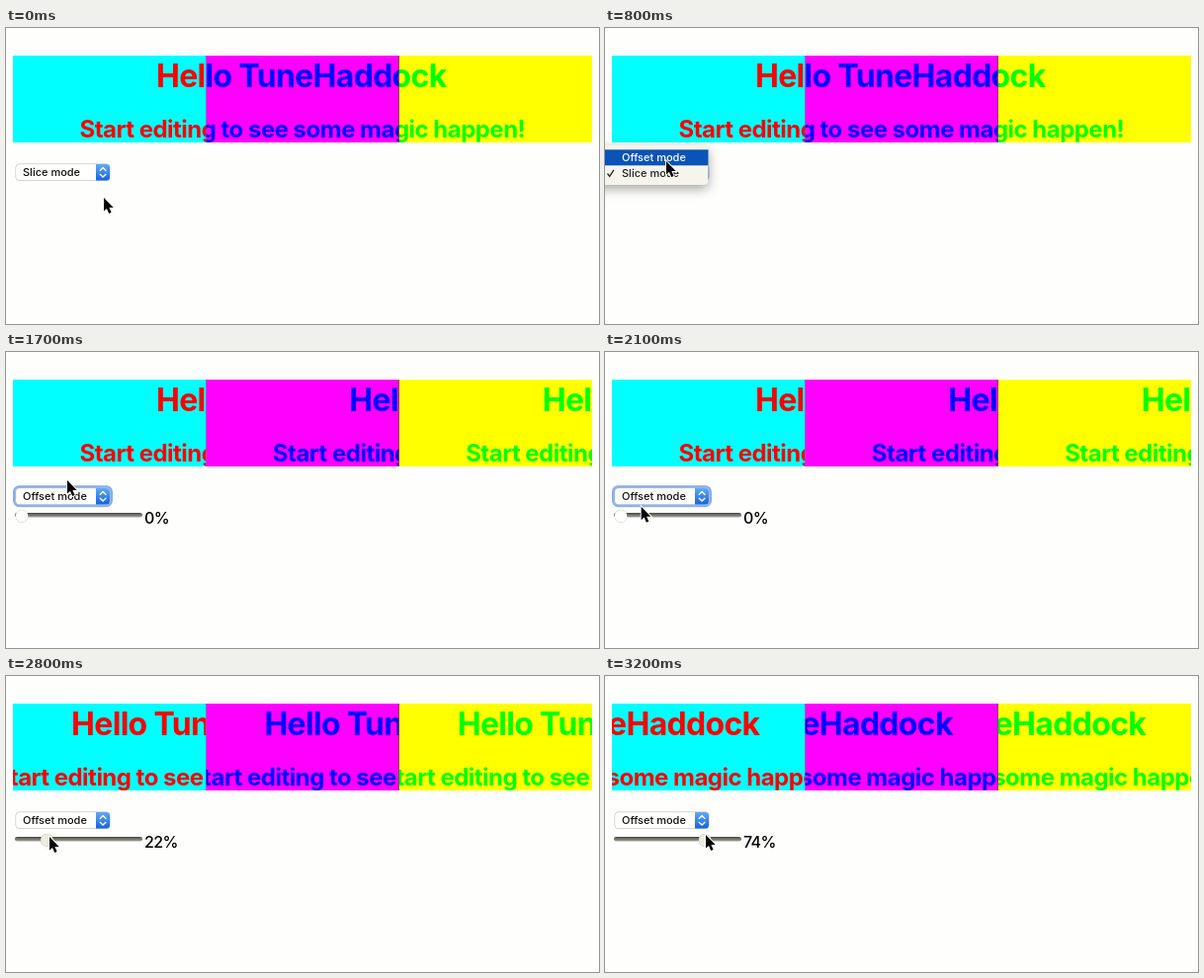
Recreate the animation shown at these times as an HTML page. Size 600x300 px, loop 3300 ms.

```html
<!DOCTYPE html>
<html lang="en">
<head>
<meta charset="utf-8">
<title>Slices</title>
<style>
html, body { margin: 0; width: 100%; height: 100%; overflow: hidden; background: #fefefc; }
#stage { display: block; width: 100vw; height: 100vh; }
text { font-family: Inter, "Open Sans", sans-serif; white-space: pre; }
.h1 { font-size: 32px; font-weight: 700; letter-spacing: -.0215em; }
.h2 { font-size: 24px; font-weight: 700; letter-spacing: -.0215em; }
.ui { font-size: 11px; font-weight: 500; fill: #111; }
#label { font-size: 16px; font-weight: 500; letter-spacing: -.04em; }
#menuBox { filter: drop-shadow(0 4px 6px rgba(0, 0, 0, .35)); }
#box { filter: drop-shadow(0 .5px .7px rgba(0, 0, 0, .45)); }
#thumb { filter: drop-shadow(0 .5px .6px rgba(0, 0, 0, .5)); }
</style>
</head>
<body>
<svg id="stage" viewBox="0 0 600 300">
  <defs>
    <linearGradient id="blue" x2="0" y2="1">
      <stop stop-color="#62a9f8"/><stop offset="1" stop-color="#1463e2"/>
    </linearGradient>
    <linearGradient id="groove" x2="0" y2="1">
      <stop stop-color="#45453f"/><stop offset="1" stop-color="#a8a89c"/>
    </linearGradient>
  </defs>
  <g id="slices"></g>
  <path d="M202.5 28V116" stroke="#5048b0" opacity=".6"/>
  <path d="M397.5 28V116" stroke="#7a2a60" opacity=".8"/>

  <rect id="ring" x="8" y="136.2" width="99" height="20" rx="5.5" fill="#a9c6f7" stroke="#86aef0" stroke-width="2"/>
  <rect id="box" x="10" y="138" width="95" height="16.5" rx="3.5" fill="#fffffd" stroke="#d4d4cc" stroke-width=".5"/>
  <path d="M91 138H101.5a3.5 3.5 0 0 1 3.5 3.5V151a3.5 3.5 0 0 1-3.5 3.5H91Z" fill="url(#blue)"/>
  <path d="M95.2 144.4l2.9-2.9 2.9 2.9M95.2 148.2l2.9 2.9 2.9-2.9" fill="none" stroke="#fff" stroke-width="1.4" stroke-linecap="round" stroke-linejoin="round"/>
  <text id="mode" class="ui" x="17" y="150"></text>

  <g id="slider">
    <rect x="9" y="163" width="129" height="4.6" rx="2.3" fill="url(#groove)"/>
    <circle id="thumb" cy="166.3" r="6.3"/>
    <text id="label" x="140" y="174"></text>
  </g>

  <g id="menu">
    <rect id="menuBox" x="-12" y="119" width="116.5" height="40" rx="4.5" fill="#f5f5ec"/>
    <rect id="bar" x="-12" width="116.5" height="16"/>
    <text id="item0" class="ui" x="17" y="135">Offset mode</text>
    <text id="item1" class="ui" x="17" y="151">Slice mode</text>
    <path id="tick" d="M2.5 147.5l2.2 2.8 4.2-6.4" fill="none" stroke-width="1.3"/>
  </g>
  <path id="cursor" d="M0 0V13.6l3-2.7 2.2 5.1 2.4-1-2.2-5H9.7Z" stroke="#fff" stroke-width="1.8" paint-order="stroke"/>
</svg>
<script>
const $ = id => document.getElementById(id);
const set = (id, attrs) => {
  for (const k in attrs) $(id).setAttribute(k, attrs[k]);
};
const show = (id, on) => { $(id).style.display = on ? '' : 'none'; };

const left = 7, total = 586, slice = total / 3;
const palette = [['#0ff', '#f00'], ['#f0f', '#00f'], ['#ff0', '#0f0']];

// Nested svg elements clip their content to one slice each.
$('slices').innerHTML = palette.map(([back, ink], i) => `
  <svg x="${left + i * slice}" y="28" width="${slice}" height="88">
    <rect width="100%" height="100%" fill="${back}"/>
    <g id="copy${i}" fill="${ink}">
      <text class="h1" x="145" y="31.8">Hello TuneHaddock</text>
      <text class="h2" x="67.5" y="82.8">Start editing to see some magic happen!</text>
    </g>
  </svg>`).join('');

// Keys are [step, ...values]; values run linearly between them.
const cursorKeys = [
  [0, 99, 172], [1, 97, 170], [4, 66, 146], [6, 66, 146], [7, 64, 140], [8, 62, 135],
  [10, 61, 130], [13, 61, 130], [17, 62, 130], [19, 62, 130], [22, 24, 170],
  [24, 16, 162], [26, 17, 162], [28, 44, 163], [30, 84, 162], [32, 102, 161]
];
const percentKeys = [[26, 0], [27, 8], [28, 22], [29, 40], [30, 56], [31, 66], [32, 74]];

function at(keys, step) {
  const i = keys.findIndex(k => k[0] >= step);
  if (i < 1) return keys[0].slice(1);
  const a = keys[i - 1], b = keys[i];
  const p = (step - a[0]) / (b[0] - a[0]);
  return a.slice(1).map((v, j) => v + (b[j + 1] - v) * p);
}

function draw(step) {
  const offsetMode = step >= 14, fading = step === 13, dragging = step >= 26;
  const [percent] = at(percentKeys, step);
  const [x, y] = at(cursorKeys, step);

  palette.forEach((_, i) => {
    const shift = offsetMode ? -percent / 100 * 2 * slice : -i * slice;
    set('copy' + i, { transform: `translate(${shift})` });
  });

  $('mode').textContent = offsetMode ? 'Offset mode' : 'Slice mode';
  show('ring', offsetMode && !dragging);
  show('slider', offsetMode);
  set('thumb', { cx: 16 + 1.15 * percent, fill: dragging ? '#ededdf' : '#fffffd' });
  $('label').textContent = Math.round(percent) + '%';

  const row = step < 7 ? 1 : 0;
  show('menu', step >= 4 && step <= 13);
  set('menu', { opacity: fading ? .32 : 1 });
  set('bar', { y: 123.3 + 16 * row, fill: fading ? '#454550' : '#0a53b8' });
  for (const i of [0, 1]) $('item' + i).style.fill = i === row ? '#fff' : '#222';
  set('tick', { stroke: row ? '#fff' : '#222' });

  set('cursor', { transform: `translate(${x} ${y})` });
}

const start = performance.now();
function tick() {
  draw(Math.floor((performance.now() - start) % 3300 / 100));
  requestAnimationFrame(tick);
}
tick();
</script>
</body>
</html>
```
